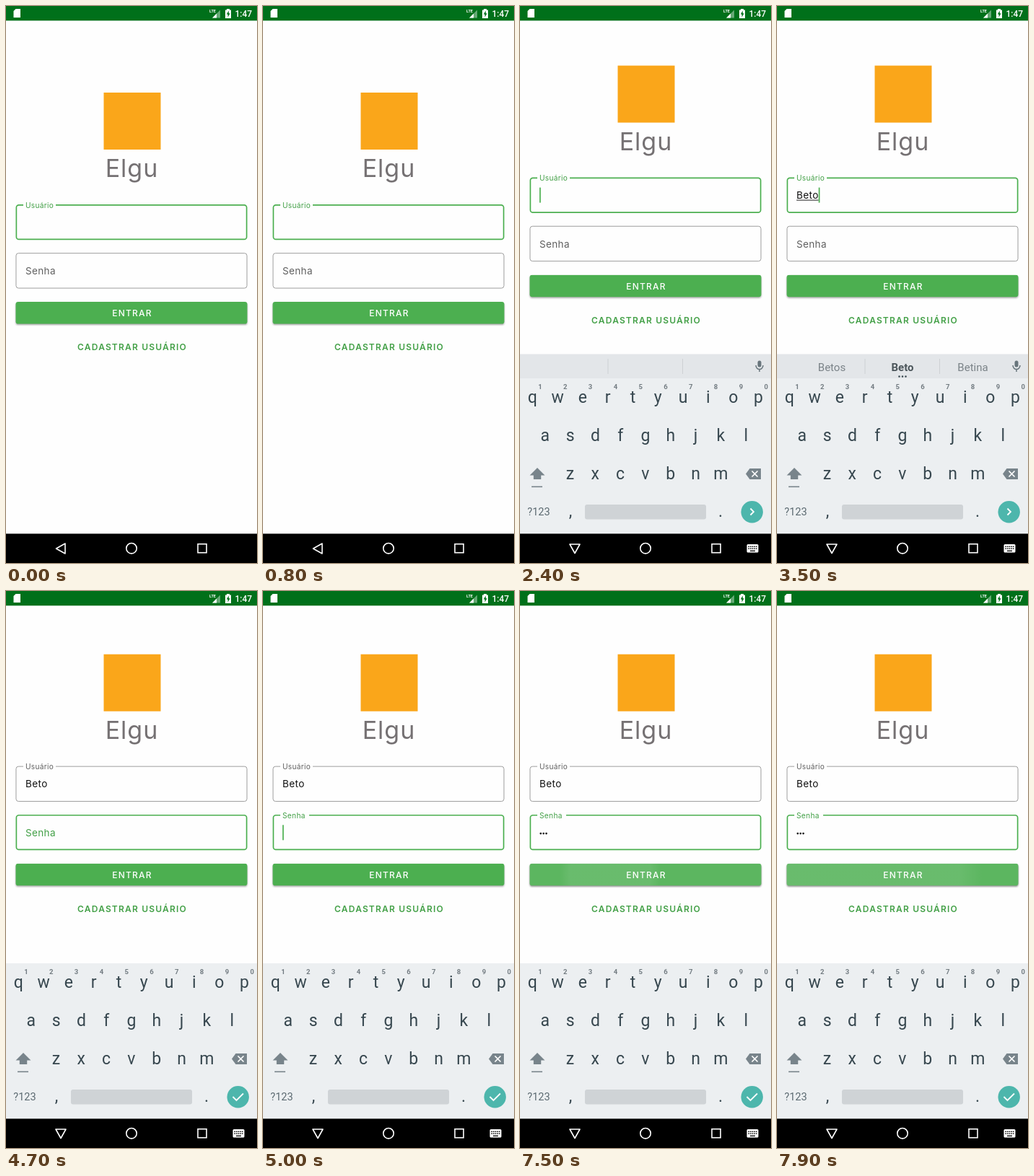
These frames come from a looping animation (348x772 px, 8 s). An HTML page:

```html
<!DOCTYPE html>
<html lang="pt">
<head>
<meta charset="utf-8">
<title>Login</title>
<style>
  html, body { margin: 0; width: 100%; height: 100%; overflow: hidden; background: #fefefe; }
  svg { display: block; width: 100%; height: 100%; }
  text { font-family: Inter, "Open Sans", sans-serif; white-space: pre; }
  .mid { text-anchor: middle; }
  .small { font-size: 10.15px; letter-spacing: .3px; }
  .body { font-size: 13.5px; letter-spacing: .4px; }
  .caps { font-size: 12px; letter-spacing: 1.2px; }
  #keyboard text, #status text { font-family: Roboto, Arial, sans-serif; }
  #keys text { fill: #37474f; text-anchor: middle; }
  #keys .letter { font-size: 23px; }
  #keys .hint { font-size: 9.5px; font-weight: 700; fill: #737c82; }
  #words text { font-size: 15px; fill: #7b8388; text-anchor: middle; }
</style>
</head>
<body>
<svg viewBox="0 0 348 772">
  <defs>
    <clipPath id="buttonShape"><rect x="13.5" y="410.1" width="321" height="30.5" rx="3.4"/></clipPath>
    <filter id="blur" x="-5%" y="-50%" width="110%" height="200%"><feGaussianBlur stdDeviation="1"/></filter>
    <radialGradient id="glow">
      <stop offset=".8" stop-color="#fff" stop-opacity=".08"/>
      <stop offset="1" stop-color="#fff" stop-opacity="0"/>
    </radialGradient>
  </defs>
  <rect width="348" height="772" fill="#fefefe"/>

  <g id="page">
    <rect x="135.5" y="120" width="79" height="79" fill="#faa61a"/>
    <text x="174.5" y="237" class="mid" font-size="34" letter-spacing="1" fill="#757173">Elgu</text>

    <rect id="userBox" fill="none"/>
    <rect x="24" y="270" width="45" height="10" fill="#fefefe"/>
    <text id="userLabel" x="27" y="279.5" class="small">Usuário</text>
    <text id="user" x="27" y="304.5" class="body" fill="#111"></text>
    <rect id="underline" x="27" y="306" height="1" fill="#222"/>

    <rect id="passBox" fill="none"/>
    <rect id="notch" x="24" y="338" height="10" fill="#fefefe"/>
    <text id="passLabel" x="27" letter-spacing=".36">Senha</text>
    <g id="dots" fill="#111"></g>
    <text id="digit" y="372.5" font-size="13.5" fill="#111"></text>
    <rect id="cursor" width="1.7" height="21" fill="#4caf50"/>

    <rect id="shadow" x="13.5" y="411.6" width="321" height="30.5" rx="3.4" filter="url(#blur)"/>
    <g clip-path="url(#buttonShape)">
      <rect x="13" y="410" width="322" height="32" fill="#4caf50"/>
      <rect id="tint" x="13" y="410" width="322" height="32" fill="#fff"/>
      <circle id="ripple" cx="125" cy="425.5" fill="url(#glow)"/>
    </g>
    <text x="175" y="430" class="mid caps" font-weight="500" fill="#fff">ENTRAR</text>
    <text x="175" y="477" class="mid caps" font-weight="600" fill="#43a047">CADASTRAR USUÁRIO</text>
  </g>

  <g id="keyboard">
    <rect y="516" width="348" height="216" fill="#eceff1"/>
    <g id="strip">
      <rect y="482.5" width="348" height="33.5" fill="#e3e6e9"/>
      <path d="M122 489v21M225.500 489v21" stroke="#cdd1d4"/>
      <rect x="329.500" y="491.500" width="5" height="9" rx="2.500" fill="#68757c"/>
      <path d="M327 498a5 5.500 0 0 0 10 0M332 503.500v3.500" fill="none" stroke="#68757c" stroke-width="1.500"/>
      <g id="words">
        <text x="76" y="506">Betos</text>
        <text x="174" y="506" font-weight="700" style="fill:#4c565b">Beto</text>
        <text x="271.500" y="506">Betina</text>
        <path d="M169.500 513.500h0M174 513.500h0M178.500 513.500h0" stroke="#37474f" stroke-width="2.600" stroke-linecap="round"/>
      </g>
    </g>
    <g id="keys"></g>
    <path d="M24 640l10.500 10.500h-5.300v5.500h-10.400v-5.500h-5.300z" fill="#78848b"/>
    <path d="M16 666.300h15" stroke="#78848b" stroke-width="1.600"/>
    <path d="M313 648.500l5.500-7.500h15.500v15h-15.500z" fill="#78848b"/>
    <path d="M321.500 644.500l8 8m0-8l-8 8" stroke="#fff" stroke-width="1.700"/>
    <text x="26" y="706" class="mid" font-size="14.500" fill="#5c6a71">?123</text>
    <rect x="90" y="691" width="168" height="20.500" rx="3" fill="#cfd3d6"/>
    <circle cx="321.700" cy="701.200" r="15.200" fill="#4db6ac"/>
    <path id="action" fill="none" stroke="#fff" stroke-width="1.800"/>
  </g>

  <g id="status">
    <rect width="348" height="20.3" fill="#00701a"/>
    <path d="M13.500 4h6.500v12h-9.500v-9z" fill="#fff"/>
    <text x="282" y="8.500" font-size="5.500" font-weight="700" fill="#fff">LTE</text>
    <path d="M297 5.500v11h-11z" fill="#fff" fill-opacity=".4"/>
    <path d="M292 10.500v6h-6z" fill="#fff"/>
    <path d="M304 5.500h2v-1.500h4v1.500h2v11.500h-8z" fill="#fff"/>
    <path d="M308.800 6.500l-3 5h1.800v4l3-5.200h-1.800z" fill="#00701a"/>
    <text x="317.500" y="14.600" font-size="12" font-weight="500" fill="#fff">1:47</text>
  </g>

  <rect y="731.4" width="348" height="41" fill="#000"/>
  <g fill="none" stroke="#fff" stroke-width="1.600">
    <path id="back" stroke-linejoin="round"/>
    <circle cx="174" cy="751.700" r="7.200"/>
    <rect x="266" y="745.700" width="12" height="12"/>
  </g>
  <g id="imeIcon">
    <rect x="314.500" y="746" width="16" height="11.500" rx="1.500" fill="#fff"/>
    <path d="M316.500 749.200h12M316.500 752h12" stroke="#000" stroke-width="1.500" stroke-dasharray="1.500 1.100"/>
    <path d="M319 755.200h7" stroke="#000" stroke-width="1.300"/>
  </g>
</svg>
<script>
const GREEN = '#4caf50', LABEL = '#43a047', GRAY = '#606060';
const el = id => document.getElementById(id);
const set = (id, attrs) => { for (const k in attrs) el(id).setAttribute(k, attrs[k]); };
const show = (id, on) => set(id, { visibility: on ? 'visible' : 'hidden' });
const clamp = v => Math.max(0, Math.min(1, v));
const mix = (a, b, p) => a + (b - a) * p;
const within = (t, spans) => spans.some(([a, b]) => t >= a && t < b);

function buildKeys() {
  const key = (x, y, s, cls = 'letter') => `<text x="${x}" y="${y}" class="${cls}">${s}</text>`;
  const row = (s, x, y) => [...s].map((c, i) => key(x + i * 34.8, y, c)).join('');
  el('keys').innerHTML = row('qwertyuiop', 17.3, 550) + row('asdfghjkl', 34.8, 603) +
    row('zxcvbnm', 69.5, 656) + key(70, 708, ',') + key(278, 708, '.') +
    [...'1234567890'].map((c, i) => key(28 + i * 34.8, 531, c, 'hint')).join('');
}

function drawBox(id, top, focused) {
  const w = focused ? 1.7 : .9, inset = w / 2;
  set(id, {
    x: 13.5 + inset, y: top + inset, width: 321 - w, height: 49.3 - w, rx: 3.4,
    stroke: focused ? GREEN : '#949494', 'stroke-width': w
  });
}

// Visible spans of the blinking caret
const BLINK = [[1100, 1600], [2400, 2900], [3300, 4000], [4500, 4700], [4800, 5300], [5500, 6500], [7000, 7500]];

function render(t) {
  const typing = t >= 2300, onPass = t >= 4700;
  const shift = onPass ? -32.3 : typing ? -37.4 : 0;
  set('page', { transform: `translate(0 ${shift})` });

  // User field
  drawBox('userBox', 275, !onPass);
  set('userLabel', { fill: onPass ? GRAY : LABEL });
  const count = t < 3300 ? 0 : Math.min(4, 2 + (t - 3300) / 100);
  el('user').textContent = 'Beto'.slice(0, count);
  const userWidth = count ? el('user').getComputedTextLength() : 0;
  set('underline', { width: onPass ? 0 : userWidth });

  // Password field with floating label
  drawBox('passBox', 342.2, onPass);
  const lift = clamp((t - 4700) / 170);
  set('notch', { width: 40 * lift });
  set('passLabel', { y: mix(372, 347.2, lift), 'font-size': mix(13.5, 10.15, lift), fill: onPass ? LABEL : GRAY });
  const typed = [5500, 5800, 6000].filter(s => t >= s).length;
  const masked = t >= 7500;
  const dots = masked ? 3 : Math.max(0, typed - 1);
  el('dots').innerHTML = [0, 1, 2].slice(0, dots)
    .map(i => `<circle cx="${28.7 + 3.9 * i}" cy="368.4" r="1.3"/>`).join('');
  el('digit').textContent = masked ? '' : typed || '';
  set('digit', { x: 26.7 + 4 * dots });

  const passWidth = 4 * dots + (masked || !typed ? 0 : typed === 1 ? 5 : 7);
  set('cursor', { x: 27 + (onPass ? passWidth : userWidth), y: onPass ? 356.6 : 289 });
  show('cursor', within(t, BLINK));

  // Button press
  const press = clamp((t - 7200) / 300);
  set('tint', { 'fill-opacity': .09 * press });
  set('ripple', { r: t < 7300 ? 0 : mix(25, 160, (t - 7300) / 600) });
  set('shadow', { fill: '#000', 'fill-opacity': mix(.35, .45, press) });

  // Keyboard and navigation
  show('keyboard', typing);
  set('keyboard', { transform: `translate(0 ${t < 2400 ? 40 : 0})` });
  set('strip', { display: onPass ? 'none' : 'inline' });
  set('words', { display: t >= 3400 ? 'inline' : 'none' });
  set('action', { d: onPass ? 'M314.500 701l5 5l9.500-9.500' : 'M319.500 696.500l4.500 4.500l-4.500 4.500' });
  const keyboardNav = t >= 2100;
  set('back', { d: keyboardNav ? 'M69 746h14l-7 12.500z' : 'M69.500 752l12.500-7v14z' });
  show('imeIcon', keyboardNav);
}

buildKeys();
const start = performance.now();
function loop() {
  const elapsed = (performance.now() - start) % 8000;
  render(Math.floor(elapsed / 100) * 100);
  requestAnimationFrame(loop);
}
loop();
</script>
</body>
</html>
```
